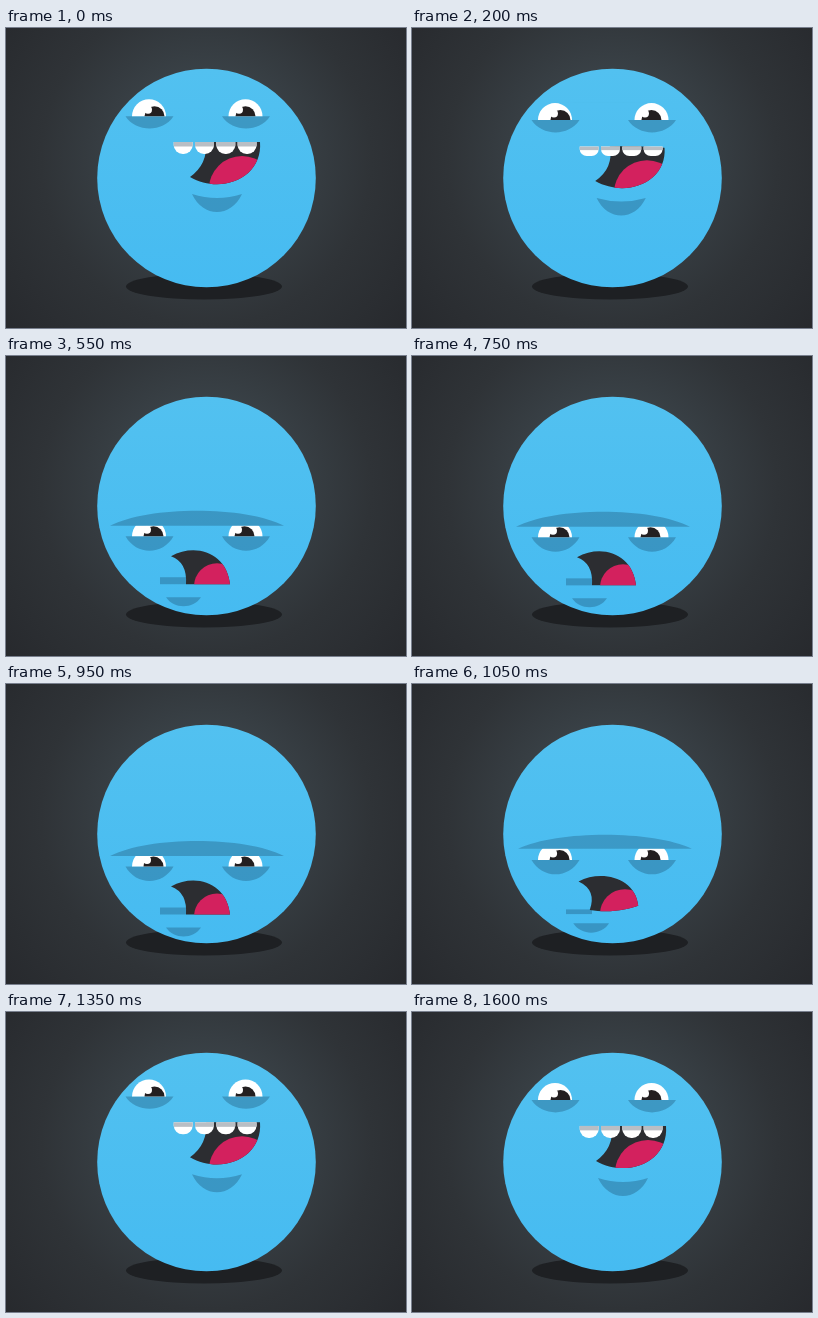
These frames come from a looping animation (400x300 px, 1.65 s). An HTML page with a canvas:

```html
<!DOCTYPE html>
<html lang="en">
<head>
<meta charset="utf-8">
<title>Mood ball</title>
<style>
  html, body { margin: 0; width: 100%; height: 100%; overflow: hidden; background: #292c30; }
  canvas { display: block; width: 400px; height: 300px; }
</style>
</head>
<body>
<canvas id="stage" width="400" height="300"></canvas>
<script>
const ctx = document.getElementById('stage').getContext('2d');
const LOOP = 1650, STEP = 50;
const DARK = '#2c2d31', SHADE = 'rgba(20,60,90,.3)';

const clamp = x => Math.max(0, Math.min(1, x));
const mix = (a, b, k) => a + (b - a) * k;
const span = (t, from, to) => clamp((t - from) / (to - from));
const cubic = x => x < .5 ? 4 * x ** 3 : 1 - 4 * (1 - x) ** 3;
const sineOut = x => Math.sin(x * Math.PI / 2);

// Mouth poses: upper edge cubic, lower edge cubic, left notch control, tongue x, y, r
const GRIN = [200,114, 218,114, 236,114, 254,114, 257,150, 215,167, 184,149, 202,136, 236,161, 33];
const GASP = [177,161, 195,153, 238,157, 239,173, 239,190, 210,205, 176,191, 201.5,178, 225,203, 32];
const FROWN = [165,200, 190,186, 221,197, 224,228, 210,228, 195,228, 180,228, 181.5,206, 211,230, 23];
const LOW_GASP = GASP.map((v, i) => i === 18 ? v : v + (i % 2 ? 19.5 : -5.5));
const POSES = [[0, GRIN], [.55, GASP], [.79, LOW_GASP], [1, FROWN]];

function mouthPose(m) {
  const i = Math.max(1, POSES.findIndex(p => p[0] >= m));
  const [from, a] = POSES[i - 1], [to, b] = POSES[i];
  const k = span(m, from, to);
  return a.map((v, j) => mix(v, b[j], k));
}

function disc(x, y, r, fill, ry = r) {
  ctx.fillStyle = fill;
  ctx.beginPath();
  ctx.ellipse(x, y, r, ry, 0, 0, 7);
  ctx.fill();
}

// Curved shadow from one end to the other; depth and dip set its two edges
function crescent(x, y, half, depth, dip, fill = SHADE) {
  ctx.fillStyle = fill;
  ctx.beginPath();
  ctx.moveTo(x - half, y);
  ctx.bezierCurveTo(x - half * .55, y + depth * 4 / 3, x + half * .55, y + depth * 4 / 3, x + half, y);
  ctx.quadraticCurveTo(x, y + dip * 2, x - half, y);
  ctx.fill();
}

function drawScene() {
  const bg = ctx.createRadialGradient(200, 125, 60, 200, 140, 270);
  bg.addColorStop(0, '#3c454b');
  bg.addColorStop(.5, '#2f3337');
  bg.addColorStop(1, '#26282c');
  ctx.fillStyle = bg;
  ctx.fillRect(0, 0, 400, 300);
  disc(198, 258.5, 78, '#1e2023', 13);
  const skin = ctx.createLinearGradient(0, 41, 0, 259);
  skin.addColorStop(0, '#52c1f0');
  skin.addColorStop(1, '#46bbf1');
  disc(200.5, 150, 109.3, skin);
}

function drawEyes(y, s) {
  const lid = y - 17.5 + 7 * s ** 1.6;
  for (const [x, pupil] of [[143, 148.5], [239.5, 239.5]]) {
    const look = pupil - s;
    crescent(x + .5, y, 24, 12.3 + 2.2 * s, 0);
    ctx.save();
    ctx.beginPath();
    ctx.rect(x - 20, lid, 40, y - lid);
    ctx.clip();
    disc(x, y, 17, '#fff');
    disc(look, y, 10, '#231f20');
    disc(look - 6.5, y - 6.5, 4, '#fff');
    ctx.restore();
  }
  const half = 87 - 24 * (1 - s) ** 2;
  crescent(191 + 32 * s * (1 - s), lid, half, -15 * s, 0, `rgba(20,60,90,${.3 * s})`);
}

function drawTeeth(y, size) {
  for (let i = 0; i < 4; i++) {
    const x = 167.7 + i * 21.3;
    ctx.fillStyle = '#fff';
    ctx.beginPath();
    ctx.roundRect(x, y, 19, 12 * size, [0, 0, 9 * size, 9 * size]);
    ctx.fill();
    ctx.fillStyle = '#b9bec4';
    ctx.fillRect(x, y, 19, 4.5 * size);
  }
}

function drawMouth(m, drift) {
  const p = mouthPose(m);
  const teeth = clamp(1 - m * 4), lip = 7 * span(m, .85, 1);
  ctx.save();
  ctx.translate(0, drift);
  ctx.fillStyle = SHADE;
  ctx.fillRect(154, 228 - lip, 26, lip);
  ctx.save();
  ctx.beginPath();
  ctx.moveTo(p[0], p[1]);
  ctx.bezierCurveTo(...p.slice(2, 8));
  ctx.bezierCurveTo(...p.slice(8, 14));
  ctx.quadraticCurveTo(p[14], p[15], p[0], p[1]);
  ctx.fillStyle = DARK;
  ctx.fill();
  ctx.clip();
  disc(p[16], p[17], p[18], '#d3215e');
  ctx.restore();
  if (teeth) drawTeeth(p[1], teeth);
  crescent(211 - 33.5 * m, 166 + 75 * m, 25 - 7.5 * m, 18 - 9 * m, 4 * clamp(1 - 2 * m));
  ctx.restore();
}

function draw(now) {
  const t = Math.floor((now + 8) / STEP) * STEP % LOOP;
  const s = cubic(span(t, 112, 512)) - cubic(span(t, 948, 1348));
  const m = clamp(s + .27 * s * (1 - s));
  const settle = t > 948 ? -3.7 * (1 - sineOut(span(t, 1348, LOOP))) : 0;
  const sag = 2.5 * span(t, 512, 948);
  const drift = mix(settle, sag, s);
  drawScene();
  drawEyes(mix(88.2, 180, s) + drift, s);
  drawMouth(m, drift);
  requestAnimationFrame(draw);
}
requestAnimationFrame(draw);
</script>
</body>
</html>
```
